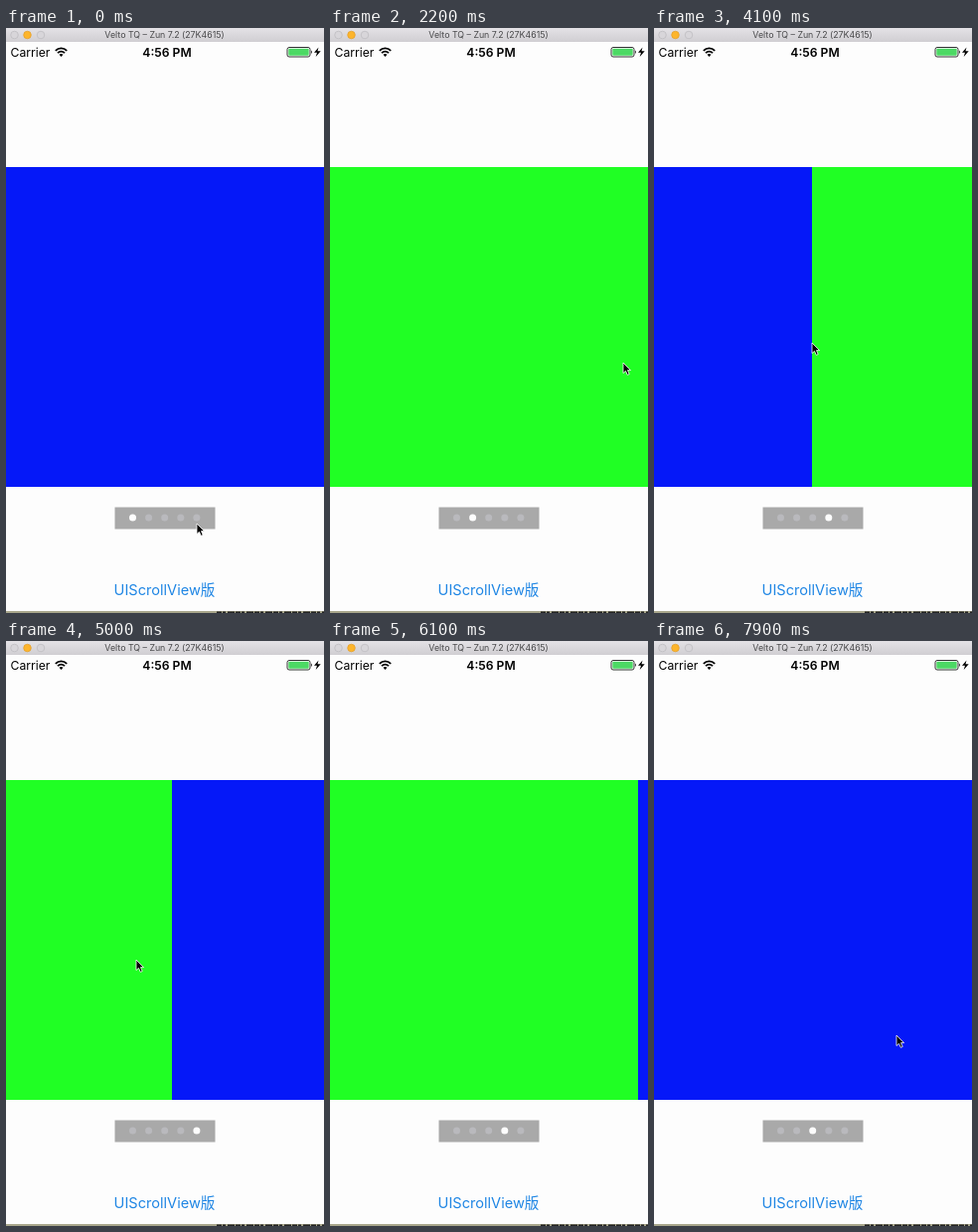
These frames come from a looping animation (320 by 589 pixels, 8000 ms). An HTML page:

```html
<!DOCTYPE html>
<html lang="en">
<head>
<meta charset="utf-8">
<title>Paged scroll view</title>
<style>
  html, body { margin: 0; width: 100%; height: 100%; overflow: hidden; background: #fdfdfd; }
  svg { display: block; width: 100%; height: 100%; }
  text { font-family: Inter, "Noto Sans CJK SC", "Noto Sans CJK JP", sans-serif; }
</style>
</head>
<body>
<svg viewBox="0 0 320 589">
  <defs>
    <linearGradient id="chrome" x2="0" y2="1">
      <stop offset="0" stop-color="#e4e2e6"/>
      <stop offset="1" stop-color="#d0ced2"/>
    </linearGradient>
  </defs>
  <rect width="320" height="589" fill="#fdfdfd"/>

  <!-- Window title bar -->
  <rect width="320" height="14" fill="url(#chrome)"/>
  <g stroke-width=".7">
    <circle cx="8.5" cy="7" r="3.8" fill="#d8d6da" stroke="#bbb9bd"/>
    <circle cx="21.5" cy="7" r="3.8" fill="#fdb52c" stroke="#e39d26"/>
    <circle cx="35" cy="7" r="3.8" fill="#d8d6da" stroke="#bbb9bd"/>
  </g>
  <text x="159.5" y="10.3" font-size="8.8" fill="#48484a" text-anchor="middle">Velto TQ – Zun 7.2 (27K4615)</text>

  <!-- Status bar -->
  <text x="4.5" y="29" font-size="12.2">Carrier</text>
  <path d="M49.8 22.8a8 8 0 0 1 11.4 0M52 25.2a5 5 0 0 1 7 0" fill="none" stroke="#000" stroke-width="1.8"/>
  <path d="M55.5 29l-2-2.2a3 3 0 0 1 4 0z"/>
  <text x="162" y="29" font-size="12.2" font-weight="600" text-anchor="middle">4:56 PM</text>
  <rect x="283" y="19.5" width="23" height="9.5" rx="2" fill="none" stroke="#333"/>
  <rect x="284.3" y="20.8" width="20.4" height="6.9" rx="1" fill="#4cd964"/>
  <path d="M307 22.5q2 1.7 0 3.5z" fill="#333"/>
  <path d="M314.5 19.5l-4.5 5.3h3l-1.3 4.2 5-5.7h-3.2z"/>

  <g id="pages"></g>

  <!-- Page control -->
  <rect x="109.5" y="482.5" width="101" height="22" fill="#a9a9a9"/>
  <g id="dots"></g>

  <text x="159.5" y="570.5" font-size="14.6" fill="#1f86e4" text-anchor="middle">UIScrollView版</text>
  <rect y="587" width="320" height="2" fill="#a9a78c"/>
  <path d="M212 588.2H320" stroke="#222" stroke-width="1.6" stroke-dasharray="5 1 3 2 7 1"/>

  <path id="cursor" d="M1 0V10.5L3.5 8.3 5.3 12.3 7.2 11.5 5.5 7.6H8.6Z"
        stroke="#fff" stroke-width=".8" stroke-linejoin="round"/>
</svg>
<script>
const LOOP = 8000, STEP = 100;
const WIDTH = 320, PAGE_COUNT = 5;
const DRAG = 153, DRAG_TIME = 200, GLIDE = 78;
const DWELL = 200, RETURN_TIME = 400;

const pages = document.getElementById('pages');
const dots = document.getElementById('dots');
const cursor = document.getElementById('cursor');

// Each swipe lets go of the page at (x, y).
const swipes = [
  { to: 1, release: 1600, x: 100, y: 338 },
  { to: 2, release: 3000, x: 141, y: 334 },
  { to: 3, release: 4096, x: 158, y: 317 },
  { to: 4, release: 5000, x: 130, y: 321 },
  { to: 3, release: 5883, x: 324, y: 316 },
  { to: 2, release: 6540, x: 230, y: 327 }
];

// The pointer wanders in, then alternates between reaching for a page and dragging it.
const home = { x: 191, y: 499 };
const moves = [{ start: 300, end: 800, x: 174, y: 511 }];
let previous = { to: 0, release: 600 };
for (const swipe of swipes) {
  const { to, release, x, y } = swipe;
  swipe.from = previous.to;
  swipe.start = release - DRAG_TIME;
  const reach = previous.release + DWELL;
  moves.push(
    { start: reach, end: Math.min(reach + RETURN_TIME, swipe.start), x: x + (to - swipe.from) * DRAG, y: y + 3 },
    { start: swipe.start, end: release, x, y }
  );
  previous = swipe;
}
moves.push(
  { start: 6740, end: 7300, x: 231, y: 293 },
  { start: 7300, end: 7700, x: 242, y: 380 },
  { start: 7800, end: 7900, x: 243, y: 397 }
);

function ease(t, start, end) {
  const k = Math.min(1, Math.max(0, (t - start) / (end - start)));
  return k * k * (3 - 2 * k);
}

function pointerAt(t) {
  let { x, y } = home;
  for (const move of moves) {
    const k = ease(t, move.start, move.end);
    x += (move.x - x) * k;
    y += (move.y - y) * k;
  }
  return `${x} ${y}`;
}

// The page follows the pointer, then glides to rest.
function swipeProgress({ start, release }, t) {
  const share = DRAG / WIDTH;
  if (t < release) return share * ease(t, start, release);
  const left = (1 - share) * Math.exp((release - t) / GLIDE);
  return left < .004 ? 1 : 1 - left;
}

function add(parent, name, attributes) {
  const node = document.createElementNS('http://www.w3.org/2000/svg', name);
  for (const key in attributes) node.setAttribute(key, attributes[key]);
  parent.append(node);
}

for (let i = 0; i < PAGE_COUNT; i++) {
  add(pages, 'rect', { x: i * WIDTH, y: 140, width: WIDTH, height: 322, fill: i % 2 ? '#20ff24' : '#0518f8' });
  add(dots, 'circle', { cx: 127.5 + i * 16.1, cy: 493, r: 3.5 });
}

function draw(now) {
  const t = Math.floor(now % LOOP / STEP) * STEP;
  const swipe = swipes.findLast(s => t > s.start);
  const current = swipe ? swipe.to : 0;
  const offset = swipe ? swipe.from + (swipe.to - swipe.from) * swipeProgress(swipe, t) : 0;
  pages.setAttribute('transform', `translate(${-Math.round(offset * WIDTH)} 0)`);
  [...dots.children].forEach((dot, i) => dot.setAttribute('fill', i === current ? '#fdfdfd' : '#b9b9bd'));
  cursor.setAttribute('transform', `translate(${pointerAt(t)})`);
}

const began = performance.now();
function tick() {
  draw(performance.now() - began);
  requestAnimationFrame(tick);
}
tick();
</script>
</body>
</html>
```
